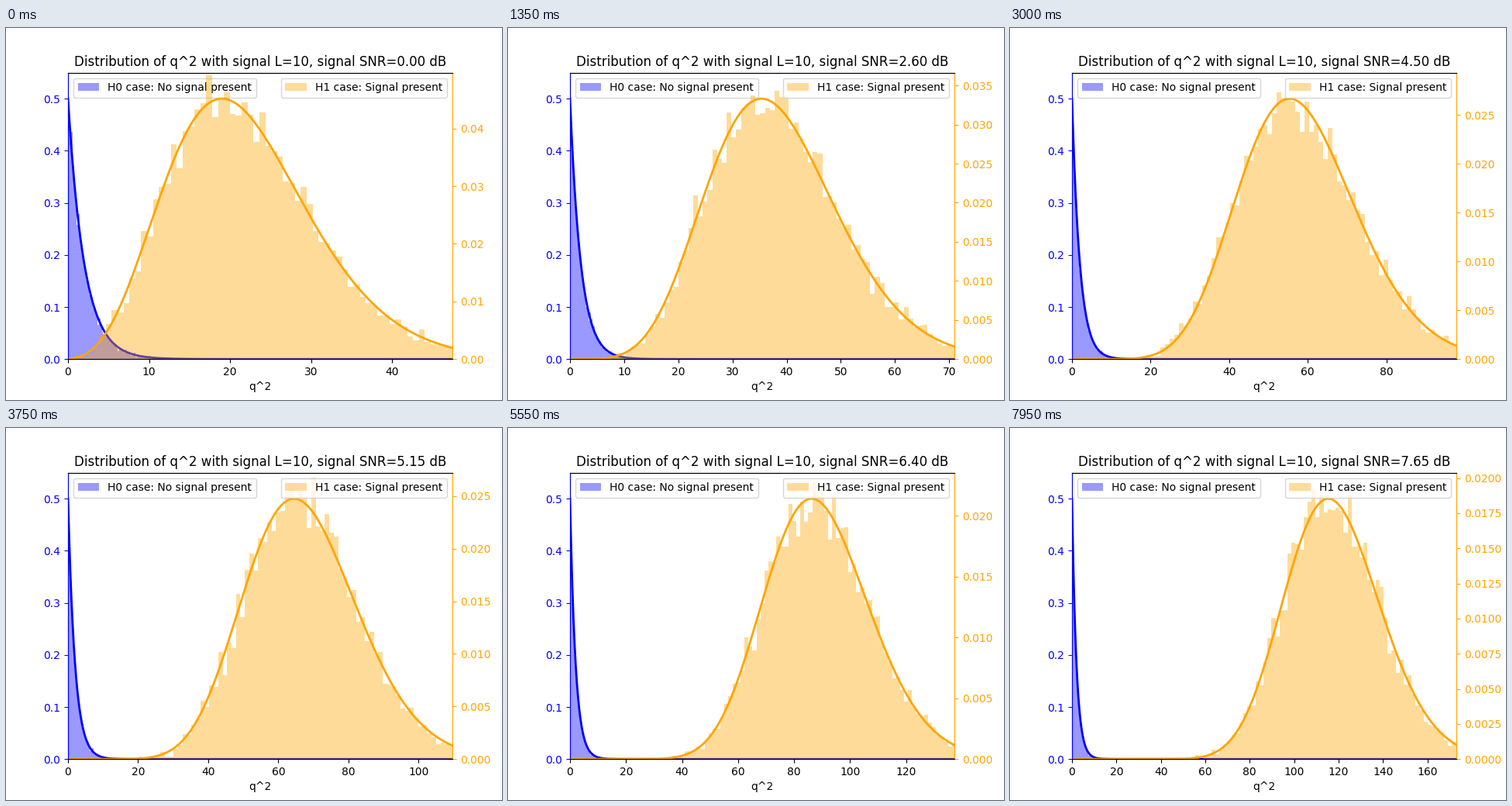
Write a matplotlib script that moves like this. It is 640 px wide and 480 px high and loops after 8000 ms.

```python
import numpy as np
import matplotlib.pyplot as plt
from matplotlib.animation import FuncAnimation

LENGTH = 10
SAMPLES = 10000
BINS = 100
INTERVAL = 50
FRAMES = 160
FRAMES_PER_STEP = 3


def density(x, shift):
    """Non-central chi-square density with two degrees of freedom."""
    return 0.5 * np.exp(-(x + shift) / 2) * np.i0(np.sqrt(shift * x))


def quantile(p, shift):
    x = np.linspace(0, 400, 8001)
    total = np.cumsum(density(x, shift)) * (x[1] - x[0])
    return np.interp(p, total, x)


def histogram(rng, shift):
    a, b = rng.standard_normal((2, SAMPLES))
    return np.histogram((a + np.sqrt(shift)) ** 2 + b ** 2, BINS, density=True)


def make_step(step):
    rng = np.random.default_rng(step)
    snr = 1 + step / 11
    shift = 2 * LENGTH * snr
    x = np.linspace(0, quantile(0.99, shift), 1000)
    return snr, x, [(density(x, s), histogram(rng, s)) for s in (0, shift)]


steps = [make_step(i) for i in range((FRAMES - 1) // FRAMES_PER_STEP + 1)]

plt.rcParams["font.family"] = "DejaVu Sans"
fig, left = plt.subplots(figsize=(6.4, 4.8), dpi=100)
right = left.twinx()


def add_case(ax, color, label, loc):
    bars = ax.stairs(np.zeros(BINS), np.arange(BINS + 1), fill=True,
                     color=color, alpha=0.4, label=label)
    curve, = ax.plot([], [], color=color, lw=2)
    ax.tick_params(axis="y", colors=color)
    ax.legend(loc=loc)
    return ax, bars, curve


cases = [
    add_case(left, "blue", "H0 case: No signal present", "upper left"),
    add_case(right, "orange", "H1 case: Signal present", "upper right"),
]
for ax in (left, right):
    ax.spines["left"].set_color("blue")
    ax.spines["right"].set_color("orange")
left.set_xlabel("q^2")
title = left.set_title("")


def update(frame):
    snr, x, data = steps[frame // FRAMES_PER_STEP]
    for (ax, bars, curve), (y, (heights, edges)) in zip(cases, data):
        bars.set_data(heights, edges)
        curve.set_data(x, y)
        ax.set_ylim(0, 1.1 * y.max())
    left.set_xlim(0, x[-1])
    title.set_text(f"Distribution of q^2 with signal L={LENGTH}, "
                   f"signal SNR={10 * np.log10(snr):.2f} dB")
    return []


anim = FuncAnimation(fig, update, frames=FRAMES, interval=INTERVAL,
                     init_func=lambda: update(0), repeat=True, repeat_delay=0)
plt.show()
```
